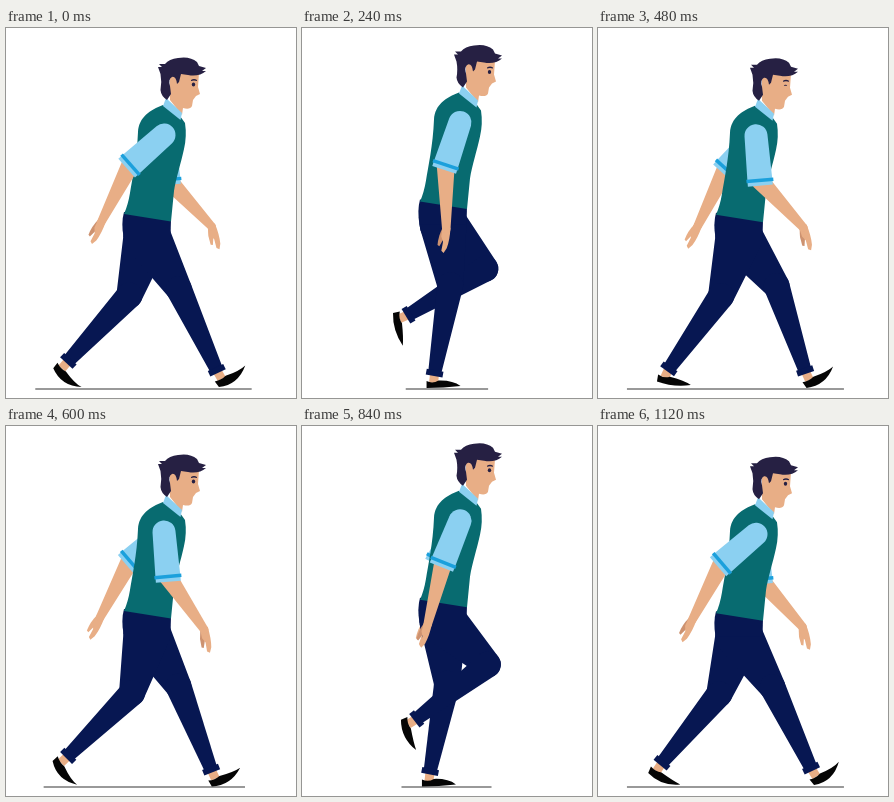
An HTML page for the animation above (1.16 s loop, 290 px wide and 370 px high).

```html
<!DOCTYPE html>
<html lang="en">
<head>
<meta charset="utf-8">
<title>Walk cycle</title>
<style>
  html, body { margin: 0; width: 100%; height: 100%; overflow: hidden; background: #fff; }
  svg { display: block; width: 100vw; height: 100vh; }
  .navy { fill: #071752; }
  .vest { fill: #086b70; }
  .skin { fill: #e8ae86; }
  .shade { fill: #cd9270; }
  .sleeve { fill: #8bd0f1; }
  .stripe { fill: #1ba0dc; }
  .hair { fill: #262043; }
  .shoe { fill: #050505; }
  .ankle { stroke: #e8ae86; stroke-width: 9; }
  .ground { stroke: #999; stroke-width: 2; }
</style>
</head>
<body>
<svg viewBox="0 0 290 370">
  <line id="ground" class="ground" y1="361" y2="361"/>
  <g id="farArm"></g>
  <g id="farLeg"></g>
  <g id="nearLeg"></g>
  <g id="body">
    <path class="navy" d="M118 184L165 191L164.500 209H117.500Q115 195 118 184Z"/>
    <path class="vest" d="M157 77C144 82 133 89 132 104C131 130 126 152 124 165Q122 177 118 186L165 193.500L168 163C170 150 175 135 178 121Q181 108 179 95L174 88Z"/>
    <path class="skin" d="M164 44V72L176 87L177 80Q184 82 186 78L187 72L190 68L194 66L192 59L193 45Z"/>
    <path class="sleeve" d="M160 70L176 85L174.500 92L157 78Z"/>
    <path class="hair" d="M152 39L156 39L153 36L159 36Q163 31 172 30Q184 28 191 34L193 38L200 40L196 43L200 43Q193 49 182 47L175 46L173 54L171 56Q170 48 166 49Q162 51 164 58L165 66L161 72Q155 68 154.500 62Q156 54 154.500 46Z"/>
    <path class="hair" d="M185 52Q188 50 191 52L191 53Q188 52 185 53Z"/>
    <ellipse id="eye" class="hair" cx="187.500" cy="56.500" rx="1.700" ry="2"/>
  </g>
  <g id="nearArm"></g>
</svg>
<script>
const LOOP = 1160, HALF = LOOP / 2, STEP = 40;
const FAR_ARM_SHIFT = HALF - 80;
const $ = id => document.getElementById(id);

// One stride of a leg in evenly spaced poses: degrees from vertical, and shoe tilt.
const THIGH = [31, 29, 14, 0, -7, -17, -16.5, 2.5, 33, 50, 51, 37];
const SHIN = [25, -1, -8, -13, -25.5, -36, -43, -57, -68.5, -42, 0, 19];
const SHOE = [-36, 0, 0, 0, 0, 10, 37, 91, 93, 51, -9, -36];

// Periodic Catmull-Rom curve through evenly spaced poses.
function pose(list, time) {
  const n = list.length, x = (time % LOOP) / LOOP * n;
  const i = Math.floor(x), u = x - i;
  const [a, b, c, d] = [-1, 0, 1, 2].map(k => list[(i + k + n) % n]);
  return b + u / 2 * (c - a + u * (2 * a - 5 * b + 4 * c - d + u * (3 * (b - c) + d - a)));
}

const wave = (time, peak, period = LOOP) => Math.cos(2 * Math.PI * (time - peak) / period);
const radians = deg => deg * Math.PI / 180;
const reach = ([x, y], length, deg) =>
  [x + length * Math.sin(radians(deg)), y + length * Math.cos(radians(deg))];
const turn = ([x, y], [dx, dy], deg) => {
  const c = Math.cos(radians(deg)), s = Math.sin(radians(deg));
  return [x + dx * c - dy * s, y + dx * s + dy * c];
};
const shape = (name, d) => `<path class="${name}" d="${d}"/>`;
const group = ([x, y], deg, content) =>
  `<g transform="translate(${x} ${y}) rotate(${deg})">${content}</g>`;
const band = (name, y, width, height) =>
  `<rect class="${name}" x="${-width / 2}" y="${y}" width="${width}" height="${height}"/>`;

// Outline around two circles; the far end is either round or flat.
function limb(a, ra, b, rb, round) {
  const dir = Math.atan2(b[1] - a[1], b[0] - a[0]);
  const spread = Math.acos((ra - rb) / Math.hypot(b[0] - a[0], b[1] - a[1]));
  const edge = (p, r, s) => [p[0] + r * Math.cos(dir + s * spread), p[1] + r * Math.sin(dir + s * spread)];
  const end = round ? `A${rb} ${rb} 0 ${+(rb > ra)} 1 ` : 'L';
  return `M${edge(a, ra, 1)}A${ra} ${ra} 0 ${+(ra > rb)} 1 ${edge(a, ra, -1)}`
    + `L${edge(b, rb, -1)}${end}${edge(b, rb, 1)}Z`;
}

function leg(time, bob) {
  const shin = pose(SHIN, time), tilt = pose(SHOE, time);
  const hip = [141, 208 + bob];
  const knee = reach(hip, 62, pose(THIGH, time));
  const cuff = reach(knee, 89.5, shin);
  const heel = turn(reach(cuff, 6, shin), [-7, 9], tilt);
  const instep = turn(heel, [7, -5], tilt);
  const sag = 5 * Math.sin(2 * radians(Math.abs(tilt)));
  const shoe = `M0 0V-7Q6 -4 12 ${-7.5 + sag / 2}Q26 ${-8 + 1.5 * sag} 34 -2Q17 ${2 * sag} 0 0Z`;
  return `<line class="ankle" x1="${cuff[0]}" y1="${cuff[1]}" x2="${instep[0]}" y2="${instep[1]}"/>`
    + group(heel, tilt, shape('shoe', shoe))
    + shape('navy', limb(hip, 23.5, knee, 13, true))
    + shape('navy', limb(knee, 13, cuff, 6.5, false))
    + group(cuff, -shin, band('navy', -3, 17, 6));
}

function arm(time, bob, thumb) {
  const upper = Math.min(5, -18.5 + 31 * wave(time, 530));
  const fore = 1 + 35.5 * wave(time, 500) + 6.6 * wave(time, 500, HALF);
  const shoulder = [158, 107 + bob];
  const cuff = reach(shoulder, 45, upper);
  const wrist = reach(cuff, 64, fore);
  const hand = shape(thumb, 'M-4 0Q-7 8 -6.500 17L-4.500 18L-1 9V0Z')
    + shape('skin', 'M-4 -2L-4 8L-1.500 13L-2 22L.5 24L3 19Q5 10 4 -2Z');
  return group(wrist, 8 - .6 * fore, hand)
    + shape('skin', limb(cuff, 9, wrist, 4.2, true))
    + shape('sleeve', limb(shoulder, 11.5, cuff, 12.5, false))
    + group(cuff, -upper, band('sleeve', 0, 25, 5) + band('stripe', -2, 27, 3.5));
}

function draw(time) {
  const bob = -5.6 + 7 * wave(time, 520, HALF);
  const halfGround = Math.min(108.5, 81 + 42 * wave(time, 500, HALF));
  const middle = 149.5 - halfGround / 9;
  $('ground').setAttribute('x1', middle - halfGround);
  $('ground').setAttribute('x2', middle + halfGround);
  $('body').setAttribute('transform', `translate(0 ${bob})`);
  $('eye').setAttribute('ry', time >= 440 && time < 560 ? .5 : 2);
  $('farArm').innerHTML = arm(time + FAR_ARM_SHIFT, bob, 'skin');
  $('farLeg').innerHTML = leg(time + HALF, bob);
  $('nearLeg').innerHTML = leg(time, bob);
  $('nearArm').innerHTML = arm(time, bob, 'shade');
}

const start = performance.now();
function tick() {
  const time = (performance.now() - start) % LOOP;
  draw(Math.floor(time / STEP) * STEP);
  requestAnimationFrame(tick);
}
tick();
</script>
</body>
</html>
```
